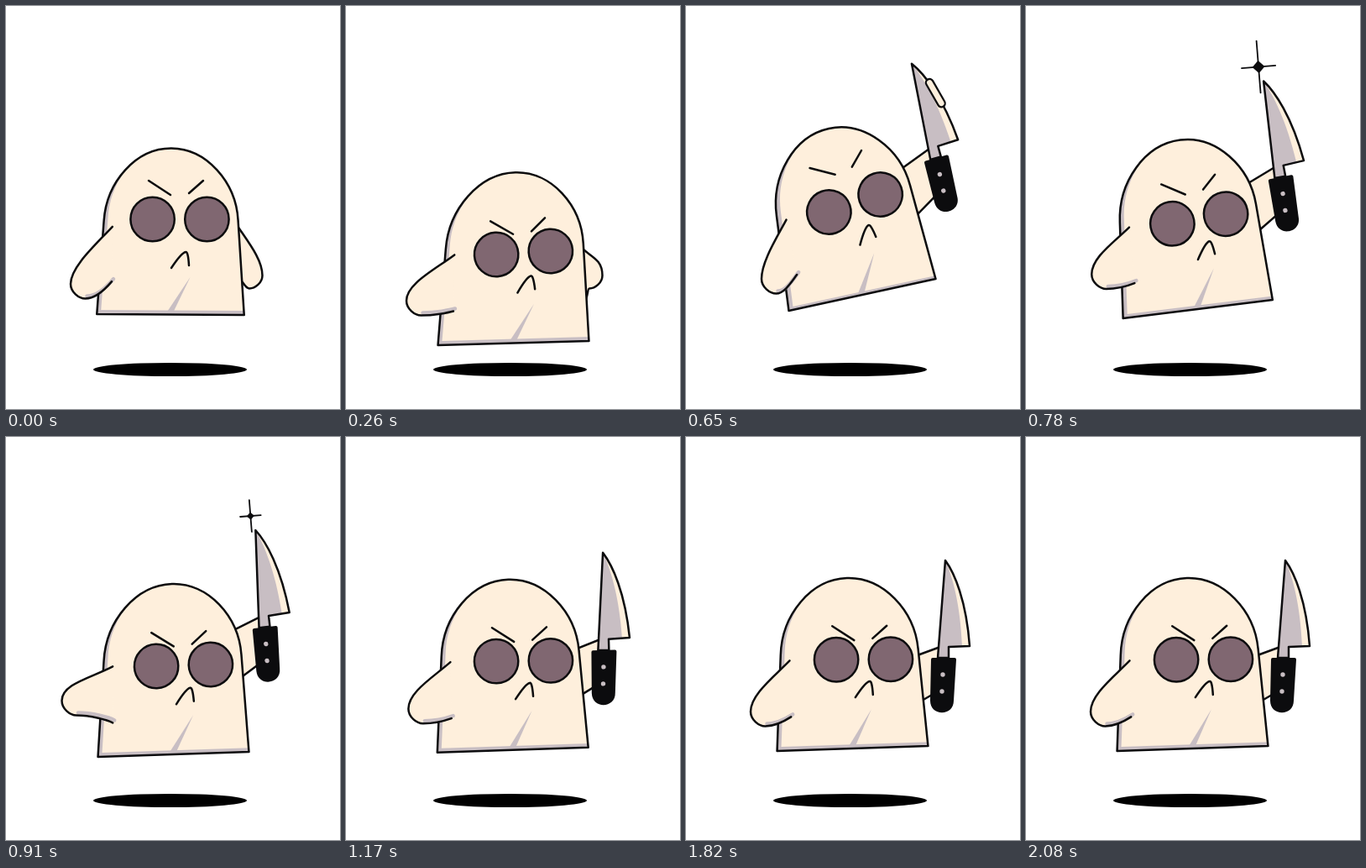
An HTML page with a canvas for the animation above (2.21 s loop, 398 px wide and 480 px high).

```html
<!DOCTYPE html>
<html lang="en">
<head>
<meta charset="utf-8">
<title>Grumpy ghost</title>
<style>
html, body { margin: 0; width: 100%; height: 100%; overflow: hidden; background: #fff; }
canvas { display: block; width: 398px; height: 480px; }
</style>
</head>
<body>
<canvas></canvas>
<script>
const W = 398, H = 480, STEP = 130, STEPS = 17;
const INK = '#0c0c0e', CREAM = '#feefdc', SHADE = '#c8bec3', EYE = '#806771';
const canvas = document.querySelector('canvas');
const ctx = canvas.getContext('2d');
const dpr = window.devicePixelRatio || 1;
canvas.width = W * dpr;
canvas.height = H * dpr;

// Ghost parts, drawn around the middle of the hem
const HEIGHT = 203;
const BODY = new Path2D('M-90 0L-82-114C-79-162-43-203 0-203C43-203 79-162 82-116L90 0Z');
const FOLD = new Path2D('M24-46L-5-2L3-2Z');

// Knife parts, drawn around the top of the handle
const BLADE = new Path2D('M2-116C13-101 27-68 31-14L6-13V0H-7Z');
const BLADE_SIDE = new Path2D('M2-116C10-98 20-65 22-13L6-13V0H-7Z');
const HANDLE = new Path2D('M-13 0H13Q15 0 15 2L12 51C12 70-16 70-16 51L-15 2Q-15 0-13 0Z');
const GRIP_ARM = new Path2D('M-4-13L-45 2V62L0 36');
const GLINT = new Path2D('M16.5-88.5L23.5-61');

// base: middle of the hem; look: face offset and turn; knife: place and turn
const base = {
  base: [198.5, 371], tilt: [-1.9], lean: [0], size: [1],
  look: [13, -106, -0.4], brow: [0], mouth: [0],
  hand: [94.5, 327], knife: [307, 263, 0]
};
const tucked = [298, 300, -15];
const calm = {
  ...base, base: [196, 367.5], tilt: [0.3], size: [0.975],
  look: [11, -113.5, 0], brow: [6], mouth: [13], hand: [94.5, 331], knife: tucked
};
const squat = {
  ...base, base: [199.5, 401.5], tilt: [-1.6], lean: [8],
  look: [12, -107.5, -3.5], mouth: [2], hand: [89.5, 351], knife: tucked
};
const leap = {
  ...base, base: [210, 344], tilt: [-12.2], lean: [3], size: [0.995],
  look: [-9, -109, -18.9], brow: [17], mouth: [4], hand: [107.5, 325], knife: [298, 181, -15.5]
};
const land = {
  ...base, base: [199.5, 378], lean: [5],
  look: [12, -106, -1.8], mouth: [1], hand: [84, 314], knife: [308.5, 226.5, -6.5]
};

const linear = t => t;
const easeOut = t => 1 - (1 - t) ** 2;
const overshoot = t => 1 + 2.7 * (t - 1) ** 3 + 1.7 * (t - 1) ** 2;
const moves = [
  { from: calm, to: squat, start: 0, end: 2, ease: linear },
  { from: squat, to: leap, start: 2, end: 5, ease: overshoot },
  { from: leap, to: land, start: 5, end: 7, ease: linear },
  { from: land, to: base, start: 7, end: 11, ease: easeOut }
];

function poseAt(step) {
  const { from, to, start, end, ease } = moves.find(m => step <= m.end) || moves.at(-1);
  const t = ease(Math.min(1, (step - start) / (end - start)));
  const pose = {};
  for (const part in from) {
    pose[part] = from[part].map((v, i) => v + (to[part][i] - v) * t);
  }
  return pose;
}

function fill(path, color) {
  ctx.fillStyle = color;
  ctx.fill(path);
}

function stroke(path, width = 2.5, color = INK) {
  ctx.lineWidth = width;
  ctx.strokeStyle = color;
  ctx.stroke(path);
}

function circle(x, y, r) {
  const path = new Path2D();
  path.arc(x, y, r, 0, Math.PI * 2);
  return path;
}

function placed(path, matrix) {
  const copy = new Path2D();
  copy.addPath(path, matrix);
  return copy;
}

function drawBody(frame) {
  const body = placed(BODY, frame);
  fill(body, SHADE);
  ctx.save();
  ctx.clip(body);
  ctx.translate(5, -5);
  fill(body, CREAM);
  ctx.restore();
  fill(placed(FOLD, frame), SHADE);
  stroke(body);
}

// A sleeve around a round hand; side is -1 for left, 1 for right
function drawArm(shoulder, [hx, hy], end, side, r) {
  const { x: sx, y: sy } = shoulder, { x: ex, y: ey } = end;
  const tip = hx + side * r, low = hy + r, round = side * r * 0.45;
  const under = [hx + 0.4 * (ex - hx), low, ex + side * 6, ey + (low - ey) * 0.35, ex, ey];

  const arm = new Path2D();
  arm.moveTo(sx, sy);
  arm.bezierCurveTo(sx + 0.42 * (tip - sx), sy + 0.33 * (hy - sy), tip, hy - 20, tip, hy);
  arm.bezierCurveTo(tip, hy + r * 0.55, hx + round, low, hx, low);
  arm.bezierCurveTo(...under);
  fill(arm, CREAM);

  if (side < 0) {
    const shade = new Path2D();
    shade.moveTo(hx, low);
    shade.bezierCurveTo(...under);
    ctx.save();
    ctx.translate(2, -3);
    stroke(shade, 4.5, SHADE);
    ctx.restore();
  }
  stroke(arm);
}

function drawFace(brow, mouth) {
  for (const side of [-1, 1]) {
    const eye = circle(side * 32.4, 0, 26.2);
    fill(eye, EYE);
    stroke(eye);
  }
  stroke(new Path2D(`M-37 ${-40 - brow}l26 17M28 ${-40 - brow}l-17 15`));
  stroke(new Path2D(`M-10 ${45 + mouth}q12-18 17-19q3-1 4 16`));
}

function drawKnife(glint) {
  fill(GRIP_ARM, CREAM);
  stroke(GRIP_ARM);
  fill(BLADE, CREAM);
  fill(BLADE_SIDE, SHADE);
  stroke(BLADE);
  if (glint) {
    stroke(GLINT, 11);
    stroke(GLINT, 6.5, CREAM);
  }
  fill(HANDLE, INK);
  fill(circle(-1, 20, 2.7), SHADE);
  fill(circle(-2, 40, 2.7), SHADE);
}

function drawStar(x, y, size) {
  ctx.save();
  ctx.translate(x, y);
  ctx.rotate(-0.08);
  stroke(new Path2D(`M0 ${-size}V${size}M${-size * 0.65} 0H${size * 0.65}`), 1.8);
  ctx.rotate(Math.PI / 4);
  const core = size * 0.34;
  fill(new Path2D(`M${-core / 2} ${-core / 2}h${core}v${core}h${-core}Z`), INK);
  ctx.restore();
}

function drawScene(step) {
  const pose = poseAt(step);
  const armed = step > 2;
  const [x, y] = pose.base, [tilt] = pose.tilt, [size] = pose.size;
  const frame = new DOMMatrix().translate(x, y).rotate(tilt)
    .multiply(new DOMMatrix([size, 0, -pose.lean[0] / HEIGHT, size, 0, 0]));
  const at = (px, py) => frame.transformPoint({ x: px, y: py });

  ctx.setTransform(dpr, 0, 0, dpr, 0, 0);
  ctx.fillStyle = '#fff';
  ctx.fillRect(0, 0, W, H);
  ctx.lineCap = ctx.lineJoin = 'round';

  const shadow = new Path2D();
  shadow.ellipse(195.5, 433, 91.5, 8, 0, 0, Math.PI * 2);
  fill(shadow, '#000');

  if (armed) {
    const [kx, ky, turn] = pose.knife;
    const grip = new DOMMatrix().translate(kx, ky).rotate(turn);
    ctx.save();
    ctx.transform(grip.a, grip.b, grip.c, grip.d, grip.e, grip.f);
    drawKnife(step === 5);
    ctx.restore();
    const tip = grip.transformPoint({ x: 2, y: -116 });
    const starSize = 31 - 12 * (step - 6);
    if (step > 5 && starSize > 0) drawStar(tip.x - 6, tip.y - 17, starSize);
  } else {
    drawArm(at(79, -112), [290, 321], at(83, -45), 1, 15.5);
  }

  drawBody(frame);
  drawArm(at(-71.5, -107), pose.hand, at(-72, -40), -1, 17.5);

  const [lookX, lookY, turn] = pose.look;
  ctx.save();
  ctx.translate(x + lookX, y + lookY);
  ctx.rotate(turn * Math.PI / 180);
  drawFace(pose.brow[0], pose.mouth[0]);
  ctx.restore();
}

const start = performance.now();
function tick() {
  const time = Math.max(0, performance.now() - start);
  drawScene(Math.floor(time / STEP) % STEPS);
  requestAnimationFrame(tick);
}
tick();
</script>
</body>
</html>
```
